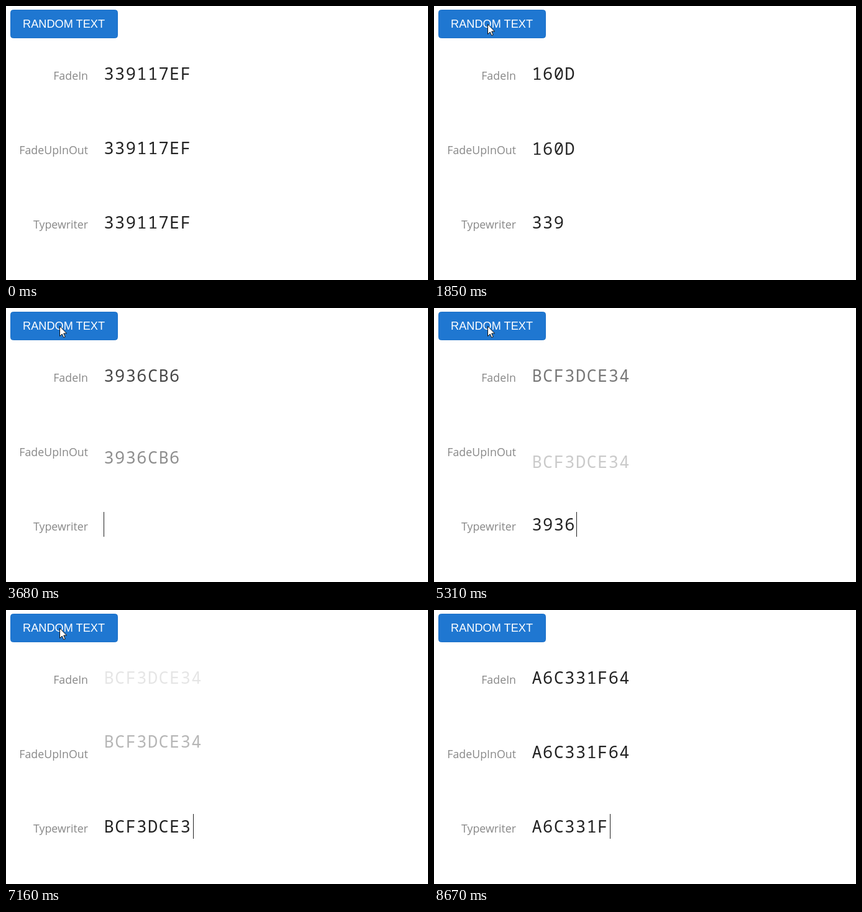
An HTML page that plays this animation: 679 px wide and 442 px high, repeating every 8740 ms.

```html
<!DOCTYPE html>
<html lang="en">
<head>
<meta charset="utf-8">
<title>Text transitions</title>
<style>
  html, body { margin: 0; width: 100%; height: 100%; overflow: hidden; background: #fff; }
  svg { display: block; }
  .btn { font: 18.2px "Liberation Sans", Arial, sans-serif; fill: #fff; }
  .label { font: 17.8px "Open Sans", "Noto Sans", sans-serif; fill: #888; text-anchor: end; }
  .value { font: 27px "Noto Sans Mono", monospace; letter-spacing: 1.4px; fill: #222; }
</style>
</head>
<body>
<svg width="679" height="442" viewBox="0 0 679 442">
  <rect x="7.5" y="6.5" width="172" height="45" rx="4" fill="#1f77d1" stroke="#1c70c7"/>
  <text class="btn" x="27" y="35">RANDOM TEXT</text>
  <text class="label" x="132" y="119">FadeIn</text>
  <text class="label" x="132" y="239">FadeUpInOut</text>
  <text class="label" x="132" y="359">Typewriter</text>
  <text class="value" id="fade" x="157.5" y="119"></text>
  <text class="value" id="rise" x="157.5" y="239"></text>
  <text class="value" id="type" x="157.5" y="359"></text>
  <rect id="caret" y="329" width="1" height="40" fill="#222"/>
  <circle id="press" cx="86" cy="29" r="12" fill="#ff0" fill-opacity=".47"/>
  <path id="pointer" d="M.5 .5V16.5L4.2 13L6.8 18.6L9.2 17.5L6.7 12H11.6Z" fill="#fff" stroke="#111"/>
</svg>
<script>
const LOOP = 8740, OUT = 200, TICK = 100, BLINK = 810, RISE = 25;
const words = ["339117EF", "160D", "3936CB6", "BCF3DCE34", "A6C331F64"];
const clicks = [1090, 3140, 4820, 6880];
const swaps = [1275, 3270, 4970, 7040];
// time, x, y of the pointer tip
const path = [
  [70, 569, 379], [600, 81, 20], [750, 86, 29],
  [7400, 86, 29], [7650, 160, 79], [7750, 160, 79], [8600, 672, 446]
];

const $ = id => document.getElementById(id);
const [fade, rise, type, caret, press, pointer] =
  ["fade", "rise", "type", "caret", "press", "pointer"].map($);

const clamp = v => Math.min(1, Math.max(0, v));
const mix = (a, b, k) => a + (b - a) * k;
const show = (el, on) => el.setAttribute("visibility", on ? "visible" : "hidden");

function bezier(x1, y1, x2, y2) {
  const at = (a, b, s) => 3 * a * s * (1 - s) ** 2 + 3 * b * s * s * (1 - s) + s ** 3;
  return v => {
    const x = clamp(v);
    let lo = 0, hi = 1;
    for (let i = 0; i < 20; i++) {
      const mid = (lo + hi) / 2;
      if (at(x1, x2, mid) < x) lo = mid; else hi = mid;
    }
    return x === 0 || x === 1 ? x : at(y1, y2, lo);
  };
}
const ease = bezier(.25, .1, .25, 1);
const inOut = bezier(.42, 0, .58, 1);

function setText(el, text, opacity, dy = 0) {
  if (el.textContent !== text) el.textContent = text;
  el.setAttribute("opacity", opacity);
  el.setAttribute("transform", `translate(0 ${dy})`);
}

function drawWords(t) {
  const n = swaps.filter(s => s <= t).length;
  const next = words[n];
  const prev = n ? words[n - 1] : next;
  const age = n ? t - swaps[n - 1] : Infinity;

  if (age < OUT) {
    const k = inOut(age / OUT);
    setText(fade, prev, 1 - ease(age / OUT));
    setText(rise, prev, 1 - k, -RISE * k);
  } else {
    const k = inOut((age - OUT) / 420);
    setText(fade, next, ease((age - OUT) / 400));
    setText(rise, next, k, RISE * (1 - k));
  }

  const step = Math.floor(age / TICK);
  const typed = step <= prev.length
    ? prev.slice(0, prev.length - step)
    : next.slice(0, step - prev.length);
  setText(type, typed, 1);

  const len = typed.length;
  const full = step === 0 || typed === next;
  caret.setAttribute("x", 157 + Math.round(full ? 17.6 * len + .6 : 18 * len));
  show(caret, (t + 3 * BLINK + BLINK - 2835) % BLINK < BLINK / 2);
}

function drawPointer(t) {
  const last = path.length - 1;
  show(pointer, t >= path[0][0] && t < path[last][0]);
  show(press, clicks.some(c => t >= c && t < c + 130));
  const i = Math.min(last, Math.max(1, path.findIndex(p => p[0] > t)));
  const [t0, x0, y0] = path[i - 1], [t1, x1, y1] = path[i];
  const k = inOut((t - t0) / (t1 - t0));
  const x = Math.round(mix(x0, x1, k)), y = Math.round(mix(y0, y1, k));
  pointer.setAttribute("transform", `translate(${x} ${y})`);
}

const start = performance.now();
function frame() {
  const t = (performance.now() - start) % LOOP;
  drawWords(t);
  drawPointer(t);
  requestAnimationFrame(frame);
}
frame();
</script>
</body>
</html>
```
